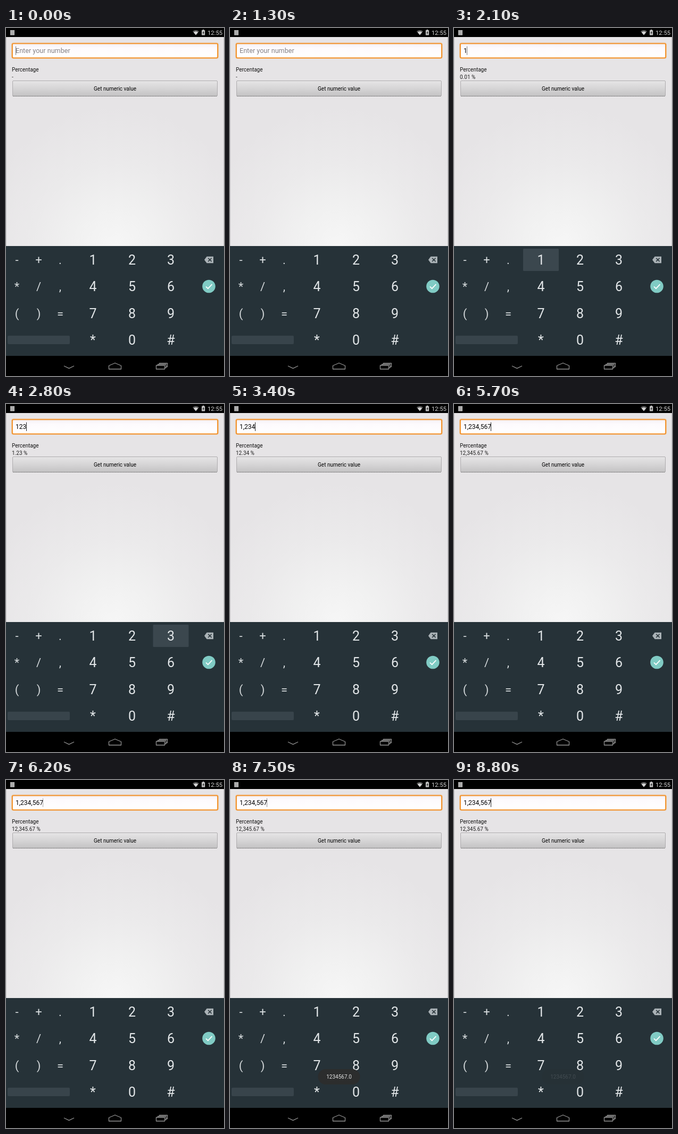
An HTML page that plays this animation: 410 by 656 pixels, repeating every 8.9 s.

```html
<!DOCTYPE html>
<html lang="en">
<head>
<meta charset="utf-8">
<title>Percentage input</title>
<style>
  html, body { margin: 0; width: 100%; height: 100%; overflow: hidden; background: #000; }
  svg { display: block; width: 100%; height: 100%; font-family: Roboto, sans-serif; }
  .small { font-size: 10px; fill: #111; }
  .key { font-size: 25px; fill: #e3e7e9; text-anchor: middle; }
  .sym { font-size: 22px; fill: #d5dadc; text-anchor: middle; }
  .nav { fill: none; stroke: #929292; stroke-width: 1.3; stroke-linejoin: round; }
</style>
</head>
<body>
<svg viewBox="0 0 410 656">
  <defs>
    <radialGradient id="page" gradientUnits="userSpaceOnUse" cx="205" cy="411" r="262">
      <stop offset="0" stop-color="#f6f6f6"/>
      <stop offset=".28" stop-color="#f1f1f1"/>
      <stop offset=".6" stop-color="#ebeaeb"/>
      <stop offset="1" stop-color="#e6e4e6"/>
    </radialGradient>
    <linearGradient id="face" x2="0" y2="1">
      <stop offset="0" stop-color="#e6e5e6"/>
      <stop offset=".5" stop-color="#d6d5d6"/>
      <stop offset="1" stop-color="#c3c2c3"/>
    </linearGradient>
    <linearGradient id="hot" x2="0" y2="1">
      <stop offset="0" stop-color="#ffcb52"/>
      <stop offset="1" stop-color="#fb9a14"/>
    </linearGradient>
    <linearGradient id="field" x2="0" y2="1">
      <stop offset="0" stop-color="#f4f0f3"/>
      <stop offset=".3" stop-color="#fdfafd"/>
      <stop offset="1" stop-color="#fff"/>
    </linearGradient>
  </defs>

  <!-- status bar -->
  <rect width="410" height="656"/>
  <rect x="8" y="4" width="8" height="9.5" fill="#b9b9b9"/>
  <path d="M10.7 4v9.5M13.3 4v9.5M8 7.2h8M8 10.3h8" stroke="#8c8c8c" stroke-width=".5"/>
  <path d="M351 6.2Q357 1.6 363 6.2L357 13.2Z" fill="#606060"/>
  <path d="M352.8 8.2Q357 5 361.2 8.2L357 13.2Z" fill="#d5d5d5"/>
  <path d="M368 4.3h1.7V3h2.8v1.3h1.7v9.2H368Z" fill="#c4c4c4"/>
  <path d="M371.8 5.5l-2.4 4h1.5l-.6 3 2.7-4.3h-1.5Z" fill="#222"/>
  <text x="379" y="13" font-size="11.3" fill="#d4d4d4">12:55</text>

  <!-- page -->
  <rect y="17" width="410" height="394" fill="url(#page)"/>
  <path d="M.5 17V411M409.5 17V411" stroke="#cfcdd0"/>
  <rect x="10.5" y="28" width="389" height="29.5" rx="3" fill="none" stroke="#f5b46c" opacity=".65"/>
  <rect x="11.9" y="29.3" width="386.2" height="27" rx="2" fill="url(#field)" stroke="#f18c20" stroke-width="1.8"/>
  <text id="input" x="18" y="47.3"></text>
  <path id="caret" d="M0 34.5V51" stroke="#222" stroke-width="1"/>
  <text class="small" x="11" y="82">Percentage</text>
  <text class="small" id="percent" x="11" y="96" style="fill:#222"></text>
  <rect id="button" x="12.5" y="99.5" width="385" height="29" rx="1.5" stroke="#adabad"/>
  <path d="M13 128.5H397" stroke="#777" stroke-dasharray="2 1"/>
  <text class="small" x="205" y="117.5" text-anchor="middle" style="fill:#000">Get numeric value</text>

  <!-- keyboard -->
  <rect y="411" width="410" height="207" fill="#263238"/>
  <rect id="press" width="67" height="42" rx="1.5" fill="#3b474e"/>
  <rect x="3" y="580" width="117" height="16" rx="2" fill="#38444b"/>
  <g id="keys"></g>
  <path d="M373 437l4.6-6.2H390v12.4H377.600Z" fill="#aab2b6"/>
  <path d="M380.200 433.700l6.400 6.400m0-6.400l-6.400 6.400" stroke="#263238" stroke-width="1.5"/>
  <circle cx="381.500" cy="487" r="12.300" fill="#80cbc4"/>
  <path d="M376 487.400l3.900 3.800 7.600-8" fill="none" stroke="#fff" stroke-width="1.700"/>

  <!-- navigation bar -->
  <path class="nav" d="M109 637l9.500 4.700 9.500-4.700"/>
  <path class="nav" d="M193.500 643v-6.500L205 631.500l11.500 5v6.500Z"/>
  <path class="nav" d="M282.500 636h16v7h-16ZM285.500 635.500v-1.500h15.500v6.500h-2M288.500 633.500v-1.500h15v6.500h-2"/>

  <g id="toast">
    <rect x="165.500" y="545" width="79" height="29" rx="14.500" fill="#2d2d2d" fill-opacity=".95"/>
    <text x="205" y="563.200" font-size="10" fill="#e4e4e4" text-anchor="middle">1234567.0</text>
  </g>
</svg>
<script>
const LOOP = 8900, STEP = 100;
const $ = id => document.getElementById(id);
const input = $('input'), caret = $('caret'), percent = $('percent');
const button = $('button'), press = $('press'), toast = $('toast');
const cols = [163.5, 237, 310], rows = [437, 487, 538, 588];

// Press time of each digit 1, 2, 3 ...
const taps = [2000, 2400, 2800, 3200, 3600, 3900, 4700];
const HOLD = 200;

// [time, opacity], each held until the next
const blink = [
  [0, .6], [100, .3], [200, 0], [600, .5], [700, 1], [1200, .5], [1300, 0],
  [1700, .5], [1800, 1], [2000, .6], [2200, 1], [4400, .4], [4500, 0], [4700, 1],
  [5100, .5], [5200, .2], [5300, 0], [5500, .3], [5600, .7], [5700, 1],
  [6200, .4], [6300, 0], [6600, .5], [6700, 1], [7100, .5], [7200, .2], [7300, 0],
  [7500, .5], [7600, 1], [8000, 0], [8400, .5], [8500, 1]
];

function addKeys(lines, xs, cls, drop) {
  lines.forEach((line, r) => [...line].forEach((char, c) => {
    const key = document.createElementNS('http://www.w3.org/2000/svg', 'text');
    key.setAttribute('class', cls);
    key.setAttribute('x', xs[c]);
    key.setAttribute('y', rows[r] + drop);
    key.textContent = char;
    $('keys').append(key);
  }));
}
addKeys(['123', '456', '789', '*0#'], cols, 'key', 9);
addKeys(['-+.', '*/,', '()='], [20.5, 61.5, 102], 'sym', 7.7);

const clamp = v => Math.max(0, Math.min(1, v));
const hold = (table, t) => table.filter(row => row[0] <= t).pop()[1];
const show = (el, alpha) => el.setAttribute('opacity', alpha);

function draw(t) {
  const count = taps.filter(tap => tap <= t).length;
  const value = Number('1234567'.slice(0, count));
  input.textContent = count ? value.toLocaleString('en-US') : 'Enter your number';
  input.setAttribute('font-size', count ? 12 : 12.6);
  input.setAttribute('fill', count ? '#000' : '#858285');
  percent.textContent = count
    ? (value / 100).toLocaleString('en-US', { minimumFractionDigits: 2 }) + ' %'
    : '-';

  const width = count ? input.getComputedTextLength() : 0;
  caret.setAttribute('transform', `translate(${Math.floor(18 + width) + .5} 0)`);
  show(caret, hold(blink, t));

  const down = count > 0 && t < taps[count - 1] + HOLD;
  show(press, down ? 1 : 0);
  if (down) {
    press.setAttribute('x', cols[(count - 1) % 3] - 33.5);
    press.setAttribute('y', rows[Math.floor((count - 1) / 3)] - 21);
  }

  button.setAttribute('fill', t >= 5900 && t < 6200 ? 'url(#hot)' : 'url(#face)');
  show(toast, Math.min(clamp((t - 6200) / 500), clamp((8870 - t) / 500)));
}

const start = performance.now();
function tick() {
  const t = (performance.now() - start) % LOOP;
  draw(Math.floor(t / STEP) * STEP);
  requestAnimationFrame(tick);
}
tick();
</script>
</body>
</html>
```
